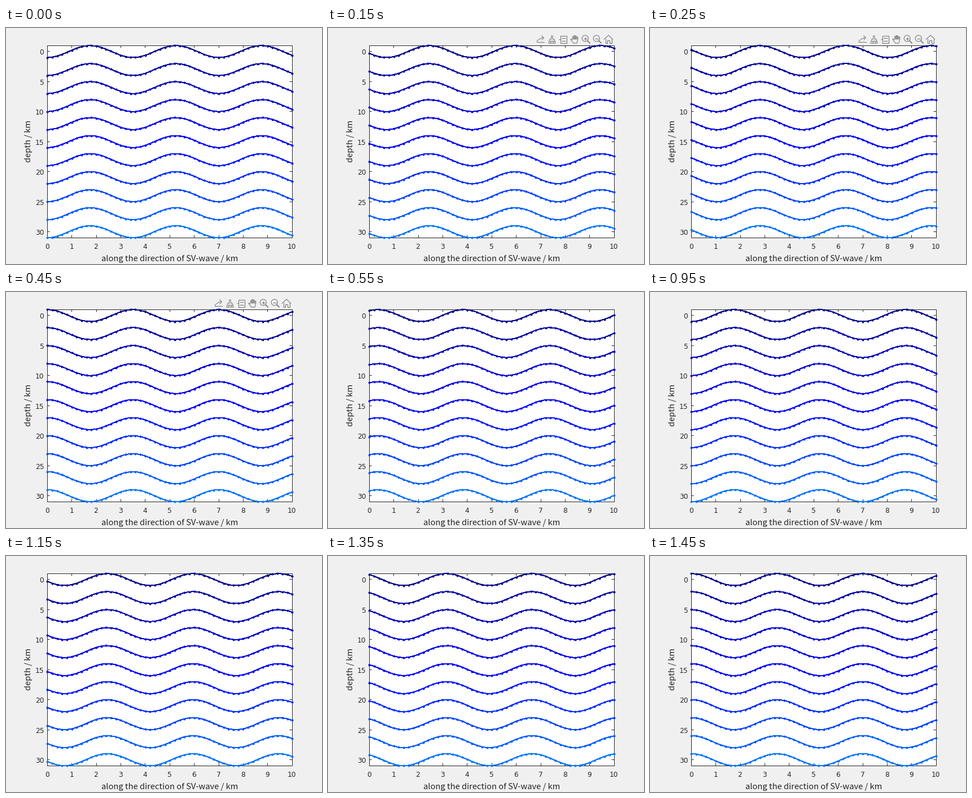
A matplotlib script that plays this animation: 560 by 420 pixels, repeating every 1.55 s.

```python
import matplotlib.pyplot as plt
import numpy as np
from matplotlib.animation import FuncAnimation
from matplotlib.patches import Circle, Rectangle

W, H, DPI = 560, 420, 80
PX = 72 / DPI                      # points per pixel
LEFT, RIGHT, TOP, BOTTOM = 73, 507, 31, 373
INK, GREY = "#262626", "#7a7a7a"
TITLE_FONT, TICK_FONT = "Noto Sans CJK JP", "DejaVu Sans"
WAVELENGTH, STEPS_PER_CYCLE = 3.5, 10
ROWS = 11
TICK = 4.5

fig = plt.figure(figsize=(W / DPI, H / DPI), dpi=DPI, facecolor="#f0f0f0")
ax = fig.add_axes([0, 0, 1, 1])
ax.set_xlim(0, W)
ax.set_ylim(H, 0)
ax.axis("off")


def to_x(km):
    return LEFT + 0.2 + km * (RIGHT - LEFT) / 10


def to_y(depth):
    return TOP + 0.2 + (depth + 1) * (BOTTOM - TOP) / 32


def stroke(xs, ys, color=INK, width=1.0, z=2):
    return ax.plot(xs, ys, color=color, lw=width * PX, zorder=z,
                   solid_capstyle="butt", solid_joinstyle="miter")[0]


def label(x, y, text, size, font, **kw):
    ax.text(x, y, text, fontsize=size * PX, family=font, color=INK,
            va="baseline", **kw)


def draw_axes():
    l, r, t, b = (edge - 0.5 for edge in (LEFT, RIGHT, TOP, BOTTOM))
    ax.add_patch(Rectangle((l, t), r - l, b - t, fc="white", ec="none"))
    stroke([l, r, r, l, l], [t, t, b, b, t])
    for km in range(11):
        x = np.floor(to_x(km)) - 0.5
        stroke([x, x], [b, b - TICK])
        stroke([x, x], [t, t + TICK])
        label(to_x(km) - 0.5, 393, str(km), 12.2, TICK_FONT, ha="center")
    for depth in range(0, 31, 5):
        y = np.floor(to_y(depth)) - 0.5
        stroke([l, l + TICK], [y, y])
        stroke([r, r - TICK], [y, y])
        label(67.5, to_y(depth) + 5.5, str(depth), 12.2, TICK_FONT, ha="right")
    label(290, 415, "along the direction of SV-wave / km", 14.75, TITLE_FONT,
          ha="center")
    label(44, 201.3, "depth / km", 14.75, TITLE_FONT, ha="center",
          rotation=90, rotation_mode="anchor")


def draw_toolbar():
    """Seven icons, one every 20 px, each drawn around its own centre."""
    parts = []

    def line(slot, pts, width=1.1):
        xs, ys = np.transpose(pts)
        parts.append(stroke(xs + 377 + 20 * slot, ys + 20, GREY, width, z=5))

    def mirrored(slot, half):
        line(slot, half + [(-x, y) for x, y in reversed(half)])

    # export: tray, curved shaft, arrow head
    t = np.linspace(0, 1, 12)
    line(0, [(-6, 1), (-6.5, 5.5), (7, 5.5)])
    line(0, np.column_stack([-4 + 8 * t, 2 - 5 * np.sqrt(t)]))
    line(0, [(1.5, -6.5), (5.5, -2.5), (1.5, 1.5)])

    # brush: handle, ferrule, bristles
    mirrored(1, [(-1.2, -7), (-1.2, 0), (-4, 0), (-6, 7)])
    for x in (-2, 2):
        line(1, [(x, 3), (1.3 * x, 7)])
    line(1, [(-4.5, 2.5), (4.5, 2.5)])

    # data tip: note with text lines and a pointer
    mirrored(2, [(0, -6.5), (-5.5, -6.5), (-5.5, 6.5), (0, 6.5)])
    for y in (-2.5, 2.5):
        line(2, [(-3, y), (4, y)])
    line(2, [(-8, 0), (-5, 0)])

    # hand: four fingers, palm, thumb
    hand = []
    for x in -3.5 + 2.5 * np.arange(4):
        tip = -7 + 0.7 * abs(x + 0.5)
        hand += [(x, 0), (x, tip), (x + 1.7, tip), (x + 1.7, 0)]
    line(3, hand + [(4, 7), (-2, 7), (-7, 0.5), (-6, -0.7), (-3.5, 1.5)])

    # zoom in and zoom out
    for slot in (4, 5):
        parts.append(ax.add_patch(Circle((375.7 + 20 * slot, 18.5), 5.5,
                                         fc="none", ec=GREY, lw=1.1 * PX,
                                         zorder=5)))
        line(slot, [(2.7, 2.5), (7.5, 7.3)], width=1.8)
        line(slot, [(-4.3, -1.5), (1.7, -1.5)])
    line(4, [(-1.3, -4.5), (-1.3, 1.5)])

    # home: roof and walls with a door
    mirrored(6, [(-8, 0.5), (0, -7.2)])
    mirrored(6, [(-5.5, -1), (-5.5, 7), (-1.7, 7), (-1.7, 1.5)])
    return parts


def row_color(row):
    level = (6 + row) / ROWS
    return (0, max(0, level - 1), min(1, level))


draw_axes()
toolbar = draw_toolbar()
km = np.linspace(0, 10, 51)
waves = [ax.plot([], [], color=row_color(r), lw=PX, marker="o", ms=4 * PX,
                 mew=0, antialiased=False, clip_on=False, zorder=4)[0]
         for r in range(ROWS)]


def update(i):
    step = (i + 1) // 2
    phase = 2 * np.pi * (km / WAVELENGTH - step / STEPS_PER_CYCLE)
    for row, wave in enumerate(waves):
        wave.set_data(to_x(km), to_y(3 * row + np.cos(phase)))
    for part in toolbar:
        part.set_visible(2 <= step <= 5)
    return waves + toolbar


anim = FuncAnimation(fig, update, frames=31, interval=50, repeat=True,
                     repeat_delay=0, blit=False)
plt.show()
```
